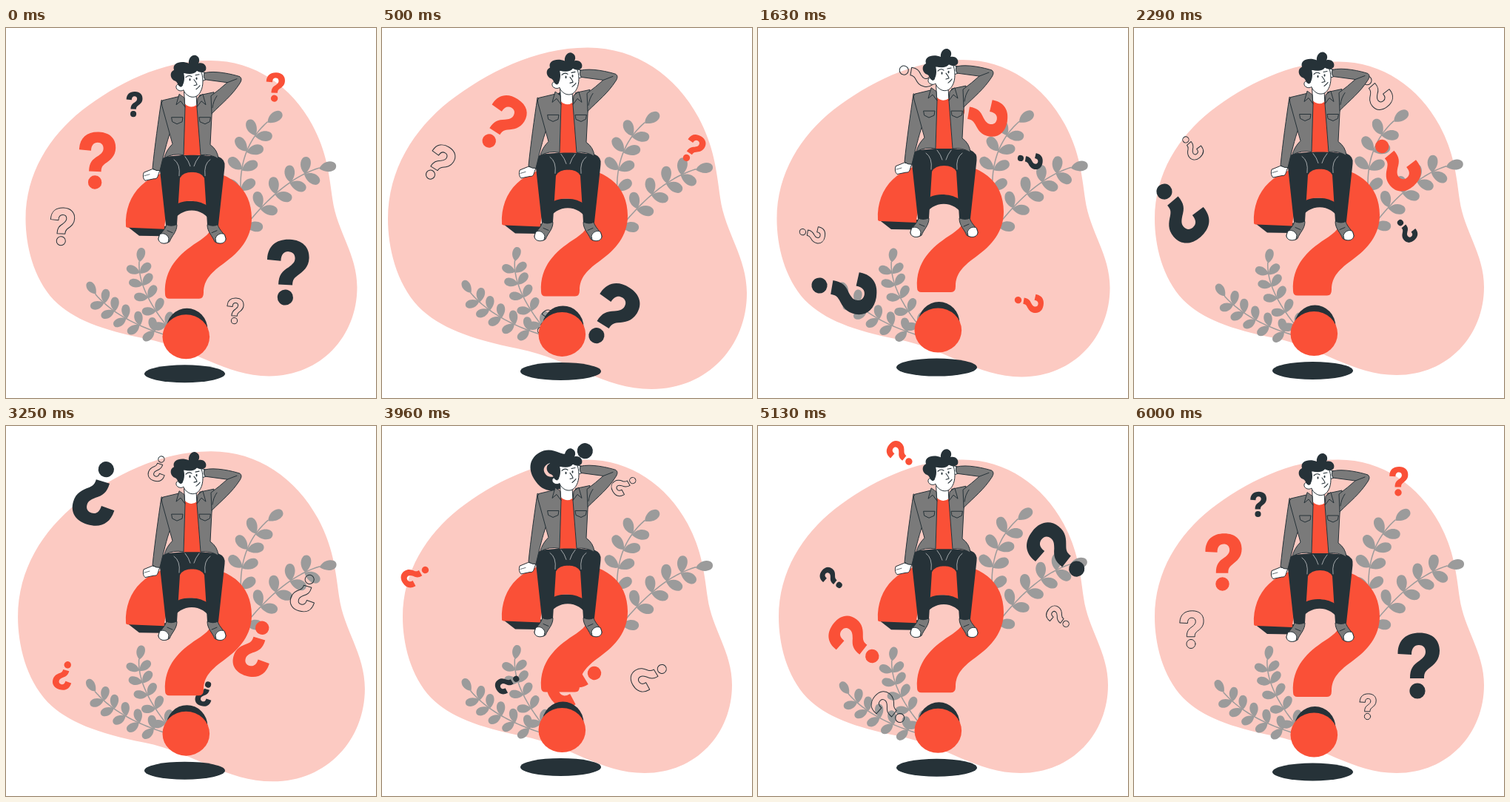
Recreate the animation shown at these times as an HTML page with a canvas. Size 500x500 px, loop 6040 ms.

```html
<!DOCTYPE html>
<html lang="en">
<head>
<meta charset="utf-8">
<title>Wondering</title>
<style>
html, body { margin: 0; width: 100%; height: 100%; overflow: hidden; background: #fff; }
canvas { display: block; width: 100vmin; height: 100vmin; }
</style>
</head>
<body>
<canvas id="stage"></canvas>
<script>
const canvas = document.getElementById('stage');
const ctx = canvas.getContext('2d');
const ratio = Math.max(1, window.devicePixelRatio || 1);
canvas.width = canvas.height = 500 * ratio;

const DARK = '#263238', RED = '#fa5037', PINK = '#fccac2';
const GREY = '#7a7a7a', LEAF = '#9b9b9b', WHITE = '#fff';
const LOOP = 6040, FPS = 24, LAST = 144;
const RAD = Math.PI / 180;

const leaf = new Path2D('M-13 1 C-8 -7 2 -10 9 -6 C14 -3 13 4 8 6 C1 9 -7 6 -13 1Z');

// Base, bend and tip of each stem; leaves grow in pairs at even steps.
const twigs = [
  { path: [317, 219, 315, 161, 353, 127], pairs: 4, size: .92 },
  { path: [324, 267, 374, 204, 423, 189], pairs: 5, size: .92 },
  { path: [217, 402, 178, 353, 180, 316], pairs: 5, size: .76 },
  { path: [201, 410, 148, 391, 121, 360], pairs: 5, size: .76 }
];

// Question mark with its dot at the origin.
const mark = new Path2D(`M-26.5 -51.5 C-26 -69 -15 -78.5 3 -78.5 C20 -78.5 30 -69 30 -54.5
  C30 -42 23 -36 15 -30 C10 -26 9 -23 9 -17 L-10 -17 C-10 -30 -6 -35 3 -41
  C8 -45 11 -48 11 -53 C11 -59 7 -62 2 -62 C-4 -62 -8 -58 -8 -49 L-26.5 -50Z`);
mark.moveTo(10.6, 0);
mark.arc(0, 0, 10.6, 0, 7);

const marks = [
  { x: 383, y: 358, size: 1, fill: DARK },
  { x: 119.5, y: 213.5, size: .87, fill: RED },
  { x: 357, y: 90, size: .445, fill: RED },
  { x: 167.5, y: 119, size: .385, fill: DARK },
  { x: 77, y: 294.5, size: .57 },
  { x: 315.5, y: 392.5, size: .39 }
];

function shape(d, fill, line, color = DARK) {
  const p = new Path2D(d);
  if (fill) { ctx.fillStyle = fill; ctx.fill(p); }
  if (line) { ctx.strokeStyle = color; ctx.lineWidth = line; ctx.stroke(p); }
}

function oval(x, y, rx, ry, fill) {
  ctx.beginPath();
  ctx.ellipse(x, y, rx, ry, 0, 0, 7);
  ctx.fillStyle = fill;
  ctx.fill();
}

function place(x, y, turn, scale, draw) {
  ctx.save();
  ctx.translate(x, y);
  ctx.rotate(turn * RAD);
  ctx.scale(scale, scale);
  draw();
  ctx.restore();
}

function about(x, y, turn, scale, draw) {
  place(x, y, turn, scale, () => { ctx.translate(-x, -y); draw(); });
}

// Draws once as given and once mirrored on a vertical axis.
function both(axis, draw) {
  draw();
  ctx.save();
  ctx.translate(2 * axis, 0);
  ctx.scale(-1, 1);
  draw();
  ctx.restore();
}

// Linear interpolation through [position, value] stops.
function stops(p, list) {
  const i = Math.max(1, list.findIndex(s => p <= s[0]));
  const [a, u] = list[i - 1], [b, v] = list[i];
  return u + (v - u) * (p - a) / (b - a);
}

function along([x0, y0, x1, y1, x2, y2], u) {
  const mix = (a, b, c) => (1 - u) ** 2 * a + 2 * u * (1 - u) * b + u * u * c;
  const slope = (a, b, c) => (1 - u) * (b - a) + u * (c - b);
  return {
    x: mix(x0, x1, x2), y: mix(y0, y1, y2),
    dir: Math.atan2(slope(y0, y1, y2), slope(x0, x1, x2)) / RAD
  };
}

function drawTwig({ path, pairs, size }) {
  ctx.beginPath();
  for (let u = -.2; u <= 1.01; u += .05) {
    const p = along(path, u);
    ctx.lineTo(p.x, p.y);
  }
  ctx.strokeStyle = ctx.fillStyle = LEAF;
  ctx.lineWidth = 1.5;
  ctx.stroke();
  for (let i = 0; i <= pairs; i++) {
    const { x, y, dir } = along(path, i / pairs);
    for (const spread of i < pairs ? [-56, 58] : [10]) {
      place(x, y, dir + spread, size, () => {
        ctx.translate(13, 0);
        ctx.fill(leaf);
      });
    }
  }
}

function drawMark({ x, y, size, fill }) {
  place(x, y, 0, size, () => {
    ctx.fillStyle = fill;
    ctx.strokeStyle = DARK;
    ctx.lineWidth = 1 / size;
    fill ? ctx.fill(mark) : ctx.stroke(mark);
  });
}

function drawBlob() {
  shape(`M275 45.5 C335 45 385 80 413 132 C432 168 435 195 440 232
    C446 275 473 305 473 350 C473 415 425 469 355 469 C295 469 255 432 190 419
    C130 407 92 393 66 367 C38 337 28 293 28 258 C28 197 60 147 104 112
    C150 77 210 45.5 275 45.5Z`, PINK);
}

function drawSeat() {
  oval(241.5, 467.5, 54.5, 12, DARK);
  oval(244.5, 408, 28, 29, DARK);
  oval(243.3, 417.5, 31.8, 30, RED);
  shape('M228 234 L272 234 L278 264 C266 241 236 241 224 264Z', DARK);
  shape('M162 267 L180 281 L212 281.5 L216 268Z', DARK);
  shape(`M162 268 C160 225 190 191 247 191 C303 191 332 217 332 257
    C332 285 315 303 296 317 C278 330 267 340 267 358 Q267 366 261 366 L221 366
    Q215 366 215 360 C213 325 235 305 258 290 C272 281 281 273 281 258
    C281 242 266 234 248 234 C228 234 215 248 214 272 L166 270 Q162 270 162 268Z`, RED);
}

function drawLegs() {
  both(251.5, () => {
    shape(`M217 266 L231 266 C231 276 224 281 221 289 C215 293 206 291 206 285
      C208 277 214 275 217 266Z`, GREY, 1);
    shape('M208 279 C213 276 219 280 220 285 L219 290 C213 293 206 291 206 285Z', WHITE, 1);
    shape('M218 274 L225 277', null, 1);
    shape(`M252 171 L216 174 Q206 178 207.5 188 L216 266 Q223 270 231 266
      L235 203 Q239 195 252 195Z`, DARK);
    shape('M227 178 Q236 184 234 200 M242 174 Q247 180 249 187', null, .7, '#d8dadb');
  });
}

function drawBody() {
  shape('M198 191 L208 193 C205 198 206 205 200 204 L188 206.5 Q184 203 186 196Z', WHITE, 1);
  shape('M187 200 L194 198', null, .7);
  shape('M210 98 C206 125 201 160 198 190 Q203 194 208 193 C213 172 217 155 222 141 L220 104Z', GREY, 1);
  shape('M241 86 L257 89 L258 108 L242 108Z', WHITE, 1);
  shape('M242 103 Q250 110 258 104 L263 172 L240 172Z', RED);
  shape(`M233 93 L212 98 Q209 101 211 106 L225 157 Q216 166 214 176
    Q226 169 240 172 L242 107Z`, GREY, 1);
  shape(`M262 91 L281 87 L278 119 L276 158 Q286 165 287 177 Q276 170 263 172
    L258 107Z`, GREY, 1);
  both(250, () => {
    shape('M234 90 L230 104 L236 99 L242 107 L241 95Z', GREY, 1);
    shape('M224 121 L239 121 L238 127 L231 130 L225 127Z', GREY, 1);
  });
}

function drawArm() {
  shape('M259 60 Q264 58 270 61 L270 70 L265 72 Q260 69 259 60Z', WHITE, 1);
  shape(`M268 61 C282 57 307 63 316 66 Q320 69 316 75 C305 92 293 101 278 116
    L277 92 Q289 83 299 74 L269 70 Q266 66 268 61Z`, GREY, 1);
  shape('M285 92 Q280 99 279 108 M299 74 L312 69', null, 1);
}

function drawHead() {
  shape(`M240 61 L263 57 C267 66 267 79 263 86 C260 92 256 94 251 93.5
    C246 93 241 88 240 84 C236 87 229 84 230 79 C231 75 236 76 238 78Z`, WHITE, 1);
  shape(`M237 80 C231 79 233 74 229 72 C222 70 220 60 227 57
    C224 47 237 44 247 48 C246 43 250 36 256 37 C262 39 262 45 260 48
    C267 46 272 52 270 57 C267 61 262 61 258 58 C255 63 247 63 240 61
    C242 68 241 75 237 80Z`, DARK);
  oval(248.5, 70, 1, 1.8, DARK);
  oval(257.5, 68.5, 1, 1.8, DARK);
  shape(`M243 67 Q247 63 251 66 M256 64 L261 63
    M254 70 Q258 75 258 77 L254 78 M257 83 Q261 80 262 78`, null, 1.1);
}

function render(ms) {
  const frame = Math.min(LAST, Math.floor((ms % LOOP + 8) * FPS / 1000));
  const t = frame / FPS;
  // The loop opens one short beat into the cycle and closes exactly on it.
  const time = t + .04 * (1 - (t / 6) ** 2);
  const turn = time / 6, wave = time / 3 % 1;

  const pulse = stops(turn, [[0, 1], [.1, 1.1], [.3, 1], [.4, 1], [.5, 1.1], [.6, 1], [1, 1]]);
  const sway = stops(wave, [[0, 0], [.25, 1], [.75, -1], [1, 0]]);
  const lift = -10 * (1 - Math.abs(2 * wave - 1));

  ctx.setTransform(ratio, 0, 0, ratio, 0, 0);
  ctx.fillStyle = WHITE;
  ctx.fillRect(0, 0, 500, 500);
  ctx.lineJoin = ctx.lineCap = 'round';

  about(250.3, 257.3, 0, pulse, drawBlob);
  about(278, 267, sway, 1, () => twigs.forEach(drawTwig));
  about(237.2, 226.5, turn * 360, 1, () => marks.forEach(drawMark));

  ctx.translate(0, lift);
  drawSeat();
  drawLegs();
  drawBody();
  drawArm();
  drawHead();
}

const start = performance.now();
function tick() {
  render(performance.now() - start);
  requestAnimationFrame(tick);
}
tick();
</script>
</body>
</html>
```
